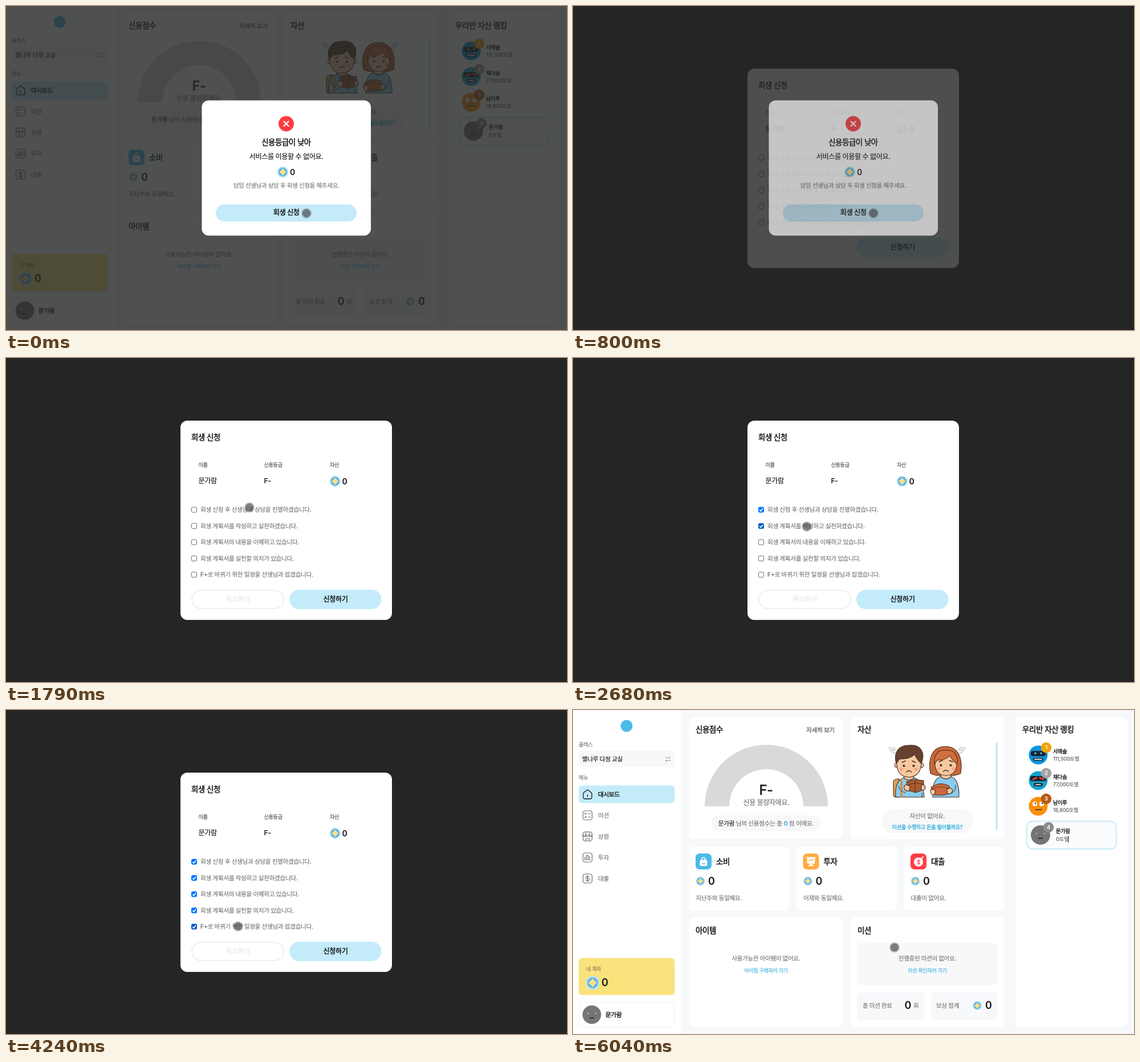
Recreate the animation shown at these times as an HTML page. Size 984 by 569 pixels, loop 6.17 s.

```html
<!DOCTYPE html>
<html lang="ko">
<head>
<meta charset="utf-8">
<style>
html, body { margin: 0; width: 100%; height: 100%; overflow: hidden; background: #242625; }
svg { display: block; width: 984px; height: 569px; }
text { font-family: Inter, "Noto Sans CJK KR", "Noto Sans CJK", sans-serif; letter-spacing: -.03em; white-space: pre; }
</style>
</head>
<body>
<svg id="stage" viewBox="0 0 984 569"></svg>
<script>
const LOOP = 6170;
const INK = '#151515', GRAY = '#707070', BLUE = '#4bbbe8', LINK = '#38afe0', SKY = '#c4ebfa', PALE = '#f7f8fa';
const USER = '문가람', UNIT = '토벨';

// Text is placed by the middle of its line. A thin outline stands in for the medium weights.
const text = (x, y, size, str, { w = 500, fill = INK, at = 'start' } = {}) => {
  const outline = { 500: .012, 600: .035 }[w] || 0;
  return `<text x="${x}" y="${y + size * .36}" font-size="${size}" font-weight="${w > 600 ? 600 : 500}" fill="${fill}" ` +
    `stroke="${fill}" stroke-width="${size * outline}" text-anchor="${at}">${str}</text>`;
};
const middle = (x, y, size, str, opt) => text(x, y, size, str, { at: 'middle', ...opt });
const box = (x1, y1, x2, y2, r, fill, extra = '') =>
  `<rect x="${x1}" y="${y1}" width="${x2 - x1}" height="${y2 - y1}" rx="${r}" fill="${fill}" ${extra}/>`;
const dot = (x, y, r, fill, extra = '') => `<circle cx="${x}" cy="${y}" r="${r}" fill="${fill}" ${extra}/>`;
const line = (d, color, width = 1.2, fill = 'none') =>
  `<path d="${d}" fill="${fill}" stroke="${color}" stroke-width="${width}" stroke-linecap="round" stroke-linejoin="round"/>`;
const at = (x, y, body, scale = 1) => `<g transform="translate(${x} ${y}) scale(${scale})">${body}</g>`;
const coin = (x, y, r) => at(x, y,
  dot(0, 0, 1, '#b5e3f7') + dot(0, 0, .77, '#5ab2e2') +
  line('M0-.5Q.2-.2 .5 0Q.2.2 0 .5Q-.2.2-.5 0Q-.2-.2 0-.5Z', '#fbdf8a', .2, '#fbdf8a'), r);

const icons = {
  home: line('M-1-7.500Q0-8.300 1-7.500L6.500-3Q7.500-2 7.500-1V5Q7.500 8 4.500 8H-4.500Q-7.500 8-7.500 5V-1Q-7.500-2-6.500-3ZM0 1V4', INK, 1.3),
  list: line('M-5-3l1 1 2-2M1-3H5M-5 3l1 1 2-2M1 3H5', GRAY),
  shop: line('M-8-2H8M-3-8V-2M3-8V-2M-8-2Q-5.5 3-3-1Q0 3 3-1Q5.5 3 8-2M-3 8V4H3V8', GRAY),
  chart: line('M-5 4V0H-2V4ZM-2 4V-4H1V4ZM1 4V-1H4V4Z', GRAY, 1.1),
  loan: line('M3-2.5Q0-5-2.5-3Q-4 0 0 0Q4 0 3 3Q0 5-3 2.5M0-6V6', GRAY),
};
const frame = box(-8, -8, 8, 8, 4, 'none', `stroke="${GRAY}" stroke-width="1.2"`);

const grayFace = (x, y, r) => at(x, y,
  dot(0, 0, 1, '#757575') + dot(-.4, -.14, .075, '#e4e4e4') + dot(.4, -.14, .075, '#e4e4e4') +
  dot(-.36, -.12, .04, '#333') + dot(.36, -.12, .04, '#333') + line('M-.2 .35H.2', '#222', .1), r);

function sidebar() {
  const menu = [['list', '미션'], ['shop', '상점'], ['chart', '투자'], ['loan', '대출']];
  return box(0, 0, 190.5, 569, 0, '#fff') + dot(94, 28, 10.5, BLUE) +
    text(10, 61, 9.2, '클래스', { fill: GRAY }) + box(10, 72, 178, 100, 5, PALE) +
    text(16, 86, 10.6, '별나루 다정 교실') +
    line('M162 84H171L168.500 81.500M171 88.500H162L164.500 91', '#999', 1) +
    text(10, 119, 9.2, '메뉴', { fill: GRAY }) + box(10, 132.5, 178.3, 163.5, 6, SKY) +
    at(25.5, 148, icons.home) + text(44, 148, 10.6, '대시보드', { w: 600 }) +
    menu.map(([icon, name], i) => at(25.5, 185 + 37 * i, frame + icons[icon]) +
      text(44, 185 + 37 * i, 10.6, name, { fill: GRAY })).join('') +
    box(10, 435.5, 178.3, 500.5, 6, '#fae27c') + text(23, 454.5, 8.9, '내 계좌', { fill: '#857a50' }) +
    coin(34.5, 479, 12) + text(50, 479, 18, '0', { w: 700 }) +
    box(10.5, 513.5, 177.5, 557, 6, '#fff', 'stroke="#f0f0f2"') +
    grayFace(33, 535, 16.3) + text(57, 535, 10.7, USER, { w: 600 });
}

function kids() {
  const edge = '#4a2d20', skin = '#f8c8a0', shirt = '#8accee';
  const shape = (d, fill) => line(d, edge, 1.1, fill);
  const face = (x, y) => [-8.5, 8.5].map(s =>
    dot(x + s, y, 2.1, '#2b1c16') + dot(x + s + .6, y - .7, .6, '#fff') +
    dot(x + s * 1.5, y + 6, 2.6, '#f3a183') +
    line(`M${x + s * 1.4} ${y - 6}L${x + s * .7} ${y - 8.5}`, edge, 1.4)).join('') +
    line(`M${x - 4.5} ${y + 11}Q${x} ${y + 6.5} ${x + 4.5} ${y + 11}`, edge, 1.3);
  const curl = (x, y, flip) => `<g transform="translate(${x} ${y}) scale(${flip} 1)">` +
    line('M6 5Q-1 5-3 0Q-3-5 2-5Q6-4 5-1Q3 2 0 0Q0-2 2-2M-5-2Q-6-4-5-6', '#9a9a9a', .9) + '</g>';
  const boy =
    shape('M562 150V126Q562 121 572 121V153H565Z', '#e0a050') +
    shape('M566 153Q564 124 580 119H598Q614 123 616 153Z', shirt) +
    line('M576 122V152', '#d58a3c', 3.5) +
    line('M571 134Q574 144 583 145M612 146V153', edge, 1) +
    shape('M580 119Q589 127 598 119L596 114H582Z', skin) +
    dot(568, 97, 4, skin, `stroke="${edge}"`) + dot(611, 97, 4, skin, `stroke="${edge}"`) +
    shape('M568 88Q566 117 589 118Q612 117 611 88Q606 72 589 72Q573 72 568 88Z', skin) +
    shape('M567 94C561 72 574 61 590 62C609 60 619 74 611 94C606 90 602 84 599 78C592 86 580 86 573 86Z', '#67412f') +
    face(589, 98) +
    shape('M585 126 600 122 615 124V140L601 145 587 141Z', '#a85c32') +
    line('M600 123V144M588 131 600 128 614 130', '#6c3219', 1.2) +
    shape('M581 133Q585 130 591 134L590 142Q583 143 581 138Z', skin) +
    shape('M611 132Q618 130 618 137Q616 143 611 140Z', skin);
  const girl =
    shape('M627 111C622 86 630 64 653 64C677 64 684 87 680 111C673 117 634 117 627 111Z', '#c9683a') +
    shape('M631 153Q629 122 645 117H663Q678 122 677 153Z', shirt) +
    line('M671 132Q672 142 664 146', edge, 1) +
    shape('M645 117Q654 125 663 117L661 111H647Z', skin) +
    shape('M635 89Q633 114 654 115Q675 114 673 89Q670 74 654 74Q638 74 635 89Z', skin) +
    shape('M634 95C632 73 646 69 655 71C669 69 676 82 674 95C668 91 664 86 661 80C654 88 645 88 639 88Z', '#d1703f') +
    face(654, 97) +
    shape('M628 136Q644 124 660 134L660 147Q644 152 631 148Z', '#c8683c') +
    line('M630 138Q645 132 659 138', '#7d371c', 1.2) +
    shape('M627 141Q631 137 636 142L634 149Q627 150 627 141Z', skin) +
    shape('M656 139Q663 135 666 141Q664 149 657 147Z', skin);
  return boy + girl + curl(560, 71, 1) + curl(682, 71, -1);
}

function summary(x, color, mark, title, note) {
  return box(x, 240, x + 177, 352, 9, '#fff') + box(x + 12, 252, x + 40, 280, 7, color) +
    at(x + 26, 266, mark) + text(x + 48, 266, 13.5, title, { w: 600 }) +
    coin(x + 20.5, 300.5, 8) + text(x + 34, 300.5, 18, '0', { w: 700 }) +
    text(x + 12.5, 330, 10.6, note, { fill: GRAY });
}

function ranking() {
  const eyes = at(-6, -4, dot(0, 0, 4, '#fff') + dot(1, -1, 1.2, '#222'));
  const faces = [
    ['#0b94dc', box(-13, -7, 13, 2, 4, '#182430') + dot(-5, -3, 1.8, '#5bc8f0') + dot(5, -3, 1.8, '#5bc8f0') +
      box(-9, 5, 9, 10, 2, '#182430') + line('M-6 7.500H6', '#e8f4fa', 2)],
    ['#12a3cc', box(-14, -8, 14, 1, 3, '#182430') + line('M-9-2 -3-5M9-2 3-5', '#f0404a', 3) +
      box(-8, 4, 8, 10, 3, '#26323c') + line('M-4 7H4', '#fff', 1.5)],
    ['#fb8f08', eyes + at(12, 0, eyes) + line('M-5 6H6', '#333', 1.5)],
  ];
  const rows = [['서해솔', '111,500', '#f0a408'], ['채다솜', '77,000', '#a3a3a3'], ['남이루', '18,800', '#b85b14']];
  const badge = (x, y, n, color) => dot(x, y, 9.3, color) + middle(x, y, 9.5, n, { w: 700, fill: '#fff' });
  return box(776, 12, 973, 557, 10, '#fff') + text(788, 34, 13.5, '우리반 자산 랭킹', { w: 600 }) +
    rows.map(([name, sum, color], i) => {
      const y = 79 + 45 * i;
      return dot(816, y, 16.5, faces[i][0]) + at(816, y, faces[i][1]) + badge(830, y - 13, i + 1, color) +
        text(842, y - 6, 9.1, name, { w: 600 }) + text(842, y + 7, 9.2, sum + UNIT, { fill: GRAY });
    }).join('') +
    box(796, 195.5, 953, 244, 10, '#fbfcfd', 'stroke="#c9eaf6" stroke-width="1.8"') +
    grayFace(820, 219.5, 17) + badge(834, 206, 4, '#8c8c8c') +
    text(847, 213, 9.3, USER, { w: 600 }) + text(847, 227, 9.3, '0' + UNIT, { fill: GRAY }) +
    '<rect id="caret" x="868.500" y="221" width="1" height="12" fill="#222"/>';
}

function dashboard() {
  const bag = box(-6.5, -3, 6.5, 8, 3, '#fff') + line('M-3-2V-4Q-3-7 0-7Q3-7 3-4V-2', '#fff', 1.6) + line('M-2.500 4H2.500', BLUE, 1.3);
  const board = line('M-8-7H8M-6-7V3H6V-7M0 3V5M-4 8 0 4 4 8', '#fff', 1.6, '#fff') + line('M-4-1-1-3 1-1 4-4', '#ffab40', 1.3);
  const money = dot(0, 1, 8, '#fff') + line('M4-4 8-8', '#fff', 2) + middle(0, 1, 10, '$', { w: 700, fill: '#ff3d47' });
  const link = { fill: LINK }, soft = { fill: GRAY }, title = { w: 600 }, bold = { w: 700 };
  return box(0, 0, 984, 569, 0, PALE) + sidebar() +
    box(203, 12, 474, 226, 10, '#fff') + text(215, 34, 13.5, '신용점수', title) +
    text(459, 35.5, 10.6, '자세히 보기', { w: 600, fill: GRAY, at: 'end' }) +
    '<path d="M231 169A108 108 0 0 1 447 169H404A65 65 0 0 0 274 169Z" fill="#d9d9d9"/>' +
    middle(338.5, 140, 24, 'F-', { w: 700, fill: '#222' }) + middle(339, 163, 12, '신용 불량자에요.', soft) +
    box(242, 185, 434, 213, 14, PALE) +
    middle(338.5, 199, 10.7, `<tspan fill="${INK}" stroke="${INK}">${USER}</tspan> 님의 신용점수는 총 ` +
      `<tspan fill="${BLUE}" font-weight="700">0</tspan> 점 이에요.`, soft) +
    box(486, 12, 757, 227, 10, '#fff') + text(499, 34, 13.5, '자산', title) + kids() +
    box(741.5, 57, 745, 211, 1.5, '#c4e8f7') + box(542, 174, 702, 216, 20, PALE) +
    middle(621.5, 186, 10.6, '자산이 없어요.', soft) +
    middle(621.5, 205.5, 9.05, '미션을 수행하고 돈을 벌어볼까요?', { ...link, w: 600 }) +
    summary(203, BLUE, bag, '소비', '지난주와 동일해요.') +
    summary(391.5, '#ffab40', board, '투자', '어제와 동일해요.') +
    summary(580, '#ff3d47', money, '대출', '대출이 없어요.') +
    box(203, 364, 474, 557, 10, '#fff') + text(215, 387, 13.5, '아이템', title) +
    middle(338.5, 436, 10.5, '사용가능한 아이템이 없어요.', soft) + middle(338.5, 458, 9.05, '아이템 구매하러 가기', link) +
    box(486, 364, 757, 557, 10, '#fff') + text(499, 387, 13.5, '미션', title) +
    box(498, 409, 745, 483, 6, PALE) +
    middle(621.5, 436, 10.5, '진행중인 미션이 없어요.', soft) + middle(621.5, 458, 9.05, '미션 확인하러 가기', link) +
    box(498, 496, 616, 545, 6, PALE) + text(508, 519, 10.5, '총 미션 완료', soft) +
    text(581.5, 519, 18, '0', bold) + text(597, 519, 10.5, '회', soft) +
    box(628, 496, 745, 545, 6, PALE) + text(637, 519, 10.6, '보상 합계', soft) +
    coin(709, 519, 8) + text(723, 519, 18, '0', bold) + ranking();
}

function notice() {
  return box(343.5, 165.7, 640, 403.3, 12, '#fff') + dot(491.5, 206.7, 13.5, '#ff3b42') +
    line('M487.500 202.700l8 8m0-8l-8 8', '#fff', 2.3) +
    middle(491.5, 239.3, 13.4, '신용등급이 낮아', { w: 600 }) +
    middle(491.7, 264.7, 12.05, '서비스를 이용할 수 없어요.') +
    coin(485.5, 291.5, 9.7) + text(498, 291.5, 14, '0', { w: 700 }) +
    middle(491.7, 315.3, 10.5, '담임 선생님과 상담 후 회생 신청을 해주세요.', { fill: '#6f7671' }) +
    box(368, 348.5, 615, 378.5, 15, SKY) + middle(491.7, 363, 12.05, '회생 신청', { w: 600 });
}

function form() {
  const pledges = ['회생 신청 후 선생님과 상담을 진행하겠습니다.', '회생 계획서를 작성하고 실천하겠습니다.',
    '회생 계획서의 내용을 이해하고 있습니다.', '회생 계획서를 실천할 의지가 있습니다.', 'F+로 바뀌기 위한 일정을 선생님과 잡겠습니다.'];
  const head = [[337.5, '이름'], [452.5, '신용등급'], [568, '자산']];
  return box(306, 110, 677, 460, 12, '#fff') + text(325, 139.5, 13.4, '회생 신청', { w: 600 }) +
    head.map(([x, s]) => text(x, 187.5, 9.05, s, { w: 600, fill: GRAY })).join('') +
    text(337.5, 215.5, 12.1, USER) + text(452.5, 215.5, 12.1, 'F-') +
    coin(577.3, 216.5, 9.7) + text(589.5, 217, 14, '0', { w: 700 }) +
    pledges.map((s, i) => {
      const y = 266.5 + 28.5 * i;
      return `<rect class="check" x="325.500" y="${y - 4.5}" width="9" height="9" rx="1.800"/>` +
        `<path class="tick" d="M327.300 ${y + .2}l2 2.200 3.700-4.700" fill="none" stroke="#fff" stroke-width="1.600"/>` +
        text(341, y - .3, 10.6, s, { fill: GRAY });
    }).join('') +
    box(326, 408, 487, 440, 16, '#fff', 'stroke="#efefef" stroke-width="2"') +
    middle(406.5, 423.5, 12.05, '취소하기', { w: 600, fill: '#e9e9e9' }) +
    box(497, 407, 658.5, 441, 17, SKY) + middle(578, 423.5, 12.05, '신청하기', { w: 600 });
}

const stage = document.getElementById('stage');
stage.innerHTML =
  `<g id="home">${dashboard()}</g>` +
  `<g id="dim">${box(0, 0, 984, 569, 0, '#242625', 'opacity=".8"')}</g>` +
  `<g id="form">${form()}</g><g id="notice">${notice()}</g>` +
  `<g id="cursor">
    <g id="rest">${dot(0, 0, 9, 'rgba(60,60,60,.3)') + dot(0, 0, 7.2, 'rgba(60,60,60,.5)')}</g>
    <g id="press">${dot(0, 0, 11.3, 'rgba(235,235,60,.75)') + dot(0, 0, 7.8, 'rgba(90,100,30,.45)')}</g>
  </g>`;

const el = id => document.getElementById(id);
const [home, dim, formBox, noticeBox, cursor, rest, press, caret] =
  ['home', 'dim', 'form', 'notice', 'cursor', 'rest', 'press', 'caret'].map(el);
const checks = [...document.querySelectorAll('.check')], ticks = [...document.querySelectorAll('.tick')];

// first step, last step, step count, end point
const moves = [
  [1400, 1790, 6, 427, 262.5], [2220, 2530, 5, 410, 296], [2840, 2980, 3, 409, 326],
  [3360, 3360, 1, 408, 353], [3760, 3960, 4, 407, 380], [4440, 4920, 8, 564, 417],
];
const presses = [[650, 800], [2060, 2140], [2610, 2680], [3080, 3150], [3620, 3690], [4110, 4240], [5320, 5380]];
const checkTimes = [2140, 2680, 3150, 3690, 4240];
// time, form opacity, notice opacity
const fades = [[0, 0, 1], [800, .19, .67], [867, .5, .35], [933, .82, .1], [1000, 1, 0]];

const within = (t, a, b) => t >= a && t < b;
const show = (node, on) => node.setAttribute('visibility', on ? 'visible' : 'hidden');

function cursorAt(t) {
  let x = 527, y = 364;
  for (const [t0, t1, n, ex, ey] of moves) {
    if (t < t0) break;
    const step = n === 1 ? 1 : Math.min(n, Math.floor((t - t0) * (n - 1) / (t1 - t0) + 1e-6) + 1);
    const p = step / n, k = p * p * (3 - 2 * p);
    x += (ex - x) * k;
    y += (ey - y) * k;
  }
  return [x, y];
}

function draw(t) {
  const [, formAlpha, noticeAlpha] = fades.findLast(f => t >= f[0]);
  const done = t >= 5380;
  show(home, t < 800 || done);
  show(dim, t < 800);
  formBox.setAttribute('opacity', done ? 0 : formAlpha);
  noticeBox.setAttribute('opacity', noticeAlpha);
  caret.setAttribute('opacity', t < 5910 ? 0 : t < 6040 ? .5 : 1);

  checks.forEach((c, i) => {
    const on = t >= checkTimes[i], hover = on && !(t >= checkTimes[i + 1]);
    const color = hover ? '#005cc8' : '#0075ff';
    c.setAttribute('fill', on ? color : '#fff');
    c.setAttribute('stroke', on ? color : '#6b6b6b');
    ticks[i].setAttribute('opacity', on ? 1 : 0);
  });

  const pressed = presses.some(([a, b]) => within(t, a, b));
  cursor.setAttribute('transform', `translate(${cursorAt(t)})`);
  cursor.setAttribute('opacity', within(t, 3290, 3360) ? 0 : 1);
  show(press, pressed);
  show(rest, !pressed);
}

const start = performance.now();
function tick() {
  draw((performance.now() - start) % LOOP);
  requestAnimationFrame(tick);
}
tick();
</script>
</body>
</html>
```
